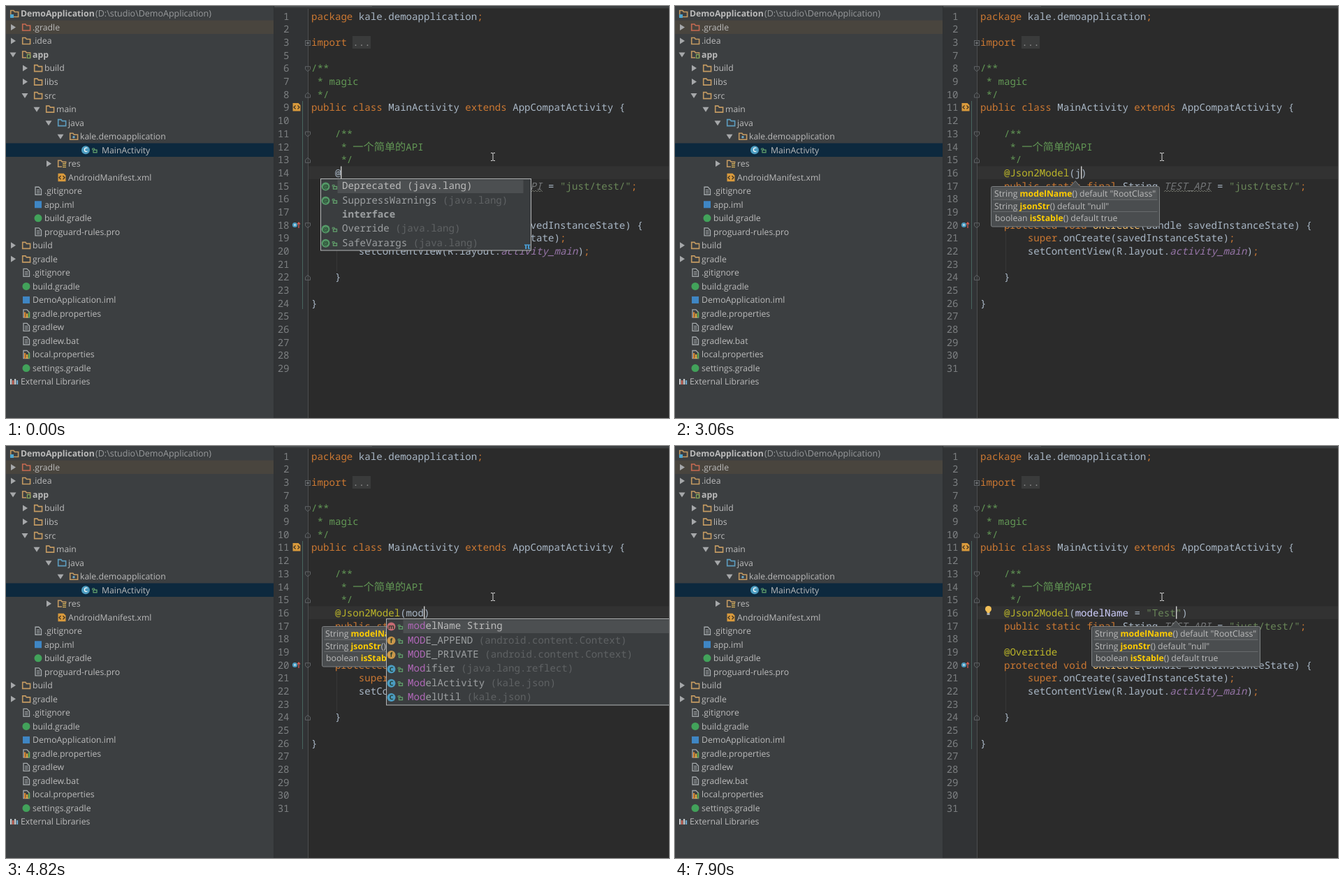
An HTML page for the animation above (8000 ms loop, 949x590 px).

```html
<!DOCTYPE html>
<html lang="en">
<head>
<meta charset="utf-8">
<title>Code completion</title>
<style>
html, body { margin: 0; width: 100%; height: 100%; overflow: hidden; background: #2b2b2b; }
svg { display: block; width: 949px; height: 590px; }
text { white-space: pre; text-rendering: geometricPrecision; }
.mono { font: 14.13px "Noto Sans Mono", monospace; fill: #a9b7c6; }
.ui { font: 12.25px "Open Sans", sans-serif; fill: #bbbbbb; }
.num { fill: #7c7f81; text-anchor: end; }
.b { font-weight: bold; }
.k { fill: #cc7832; }
.d { fill: #629755; }
.c { fill: #629755; font: 15.2px "Noto Sans CJK SC", "Noto Sans CJK", sans-serif; }
.f { fill: #8c8c8c; }
.a { fill: #bbb529; }
.s { fill: #6a8759; }
.m { fill: #ffc66d; }
.i { fill: #9876aa; font-style: italic; }
.u { fill: #747678; font-style: italic; }
.n { fill: #d0d0ff; }
.p { fill: #ffef28; font-weight: bold; }
.x { fill: #b067b8; }
.y { fill: #ffcc00; font-weight: bold; }
.t { fill: #5f6264; }
</style>
</head>
<body>
<svg viewBox="0 0 949 590">
  <g id="tree"></g>
  <g id="editor"></g>
  <g id="live"></g>
</svg>
<script>
const CW = 8.478, ROW = 18.67, TREE_ROW = 19.52;
const colX = c => 437 + c * CW;
const rowY = r => 15 + r * ROW;
const $ = id => document.getElementById(id);

// Drawing helpers
const rect = (x, y, w, h, fill, more = '') =>
  `<rect x="${x}" y="${y}" width="${w}" height="${h}" fill="${fill}" ${more}/>`;
const line = (d, stroke, more = '') => `<path d="${d}" fill="none" stroke="${stroke}" ${more}/>`;
const shape = (d, fill) => `<path d="${d}" fill="${fill}"/>`;
const disc = (x, y, r, fill) => `<circle cx="${x}" cy="${y}" r="${r}" fill="${fill}"/>`;
const wave = (x, y, w, color) =>
  line(`M${x} ${y}` + 'l2 -2l2 2'.repeat(Math.max(1, Math.round(w / 4))), color);
// «kword» gives the word the class k
const mark = s => s.replace(/«(\w)(.*?)»/g, '<tspan class="$1">$2</tspan>');
const plain = s => s.replace(/«\w|»/g, '');
const mono = (x, y, s, cls = '') => `<text class="mono ${cls}" x="${x}" y="${y + 4.8}">${mark(s)}</text>`;
const ui = (x, y, s, cls = '') => `<text class="ui ${cls}" x="${x}" y="${y + 4.4}">${mark(s)}</text>`;

// Icons, centred on x, y
const folder = (x, y, c) =>
  line(`M${x - 5.3} ${y + 4.5}v-9h4.2l1.5 2h5.2v7z`, c, 'stroke-width="1.6"');
const badge = (x, y, c, ch, ink = '#fff') => disc(x, y, 6, c) +
  `<text x="${x}" y="${y + 3.2}" text-anchor="middle" fill="${ink}" style="font:bold 9px 'Open Sans',sans-serif">${ch}</text>`;
const lock = (x, y) => rect(x - 2, y, 5, 3.6, 'none', 'stroke="#62a06c" stroke-width="1.3"') +
  line(`M${x - 3.3} ${y}v-2.2h3v2`, '#62a06c');
const bars = (x, y, cols) => cols.map((c, i) => rect(x + i * 3, y - 3 + i * 2 % 4, 2.2, 8 - i * 2 % 4, c)).join('');
const page = (x, y) => line(`M${x - 4} ${y - 5.5}h5l3.5 3.5v7.5h-8.5z`, '#a4a9ac', 'stroke-width="1.3"');

const icons = {
  dir: (x, y) => folder(x, y, '#c39a62'),
  out: (x, y) => folder(x, y, '#c66a52'),
  java: (x, y) => folder(x, y, '#5c9cbe'),
  root: (x, y) => folder(x, y, '#c39a62') + rect(x - 6, y + 1, 5, 5, '#4fa6d0'),
  mod: (x, y) => folder(x, y, '#c39a62') + rect(x, y - 1, 6, 6, '#3c3f41') +
    rect(x + 1.5, y, 4, 5, 'none', 'stroke="#86a85a" stroke-width="1.3"'),
  pkg: (x, y) => folder(x, y, '#c39a62') + disc(x, y + 1, 1.7, '#6faccb'),
  res: (x, y) => folder(x, y, '#c39a62') + rect(x, y - 1, 7, 7, '#3c3f41') +
    line(`M${x + 1} ${y}h5m-5 2.5h5m-5 2.5h5`, '#d9b45a', 'stroke-width="1.3"'),
  file: (x, y) => page(x, y) + line(`M${x - 2} ${y - 1.5}h4.5m-4.5 2.2h4.5m-4.5 2.2h4.5`, '#a4a9ac'),
  prop: (x, y) => page(x, y) + bars(x - 3, y + 1, ['#d9822f', '#e2b13f', '#5aa35a']),
  iml: (x, y) => rect(x - 5, y - 5, 10, 10, '#3f86c4'),
  gradle: (x, y) => disc(x, y, 5.5, '#42a25a'),
  xml: (x, y) => shape(`M${x - 5.5} ${y - 5.5}h8l3 3v8.5h-11z`, '#d99a3c') +
    line(`M${x - 1.5} ${y - 2}l-2.5 2.5l2.5 2.5m3 -5l2.5 2.5l-2.5 2.5`, '#3a3022', 'stroke-width="1.2"'),
  cls: (x, y) => badge(x, y, '#4b9cc0', 'C') + lock(x + 13, y),
  libs: (x, y) => bars(x - 6, y - 1, ['#c9ced1', '#d06a5c', '#c9ced1', '#6fa6c8'])
};

// depth, icon, arrow, label
const nodes = [
  [-1, 'root', '', 'DemoApplication'],
  [0, 'out', '>', '.gradle'], [0, 'dir', '>', '.idea'], [0, 'mod', 'v', 'app'],
  [1, 'dir', '>', 'build'], [1, 'dir', '>', 'libs'], [1, 'dir', 'v', 'src'],
  [2, 'dir', 'v', 'main'], [3, 'java', 'v', 'java'], [4, 'pkg', 'v', 'kale.demoapplication'],
  [5, 'cls', '', 'MainActivity'], [3, 'res', '>', 'res'], [3, 'xml', '', 'AndroidManifest.xml'],
  [1, 'file', '', '.gitignore'], [1, 'iml', '', 'app.iml'], [1, 'gradle', '', 'build.gradle'],
  [1, 'file', '', 'proguard-rules.pro'], [0, 'dir', '>', 'build'], [0, 'dir', '>', 'gradle'],
  [0, 'file', '', '.gitignore'], [0, 'gradle', '', 'build.gradle'], [0, 'iml', '', 'DemoApplication.iml'],
  [0, 'prop', '', 'gradle.properties'], [0, 'file', '', 'gradlew'], [0, 'file', '', 'gradlew.bat'],
  [0, 'prop', '', 'local.properties'], [0, 'gradle', '', 'settings.gradle'], [-1, 'libs', '', 'External Libraries']
];
const badNodes = [0, 3, 6, 7, 8, 9, 10];
const treeY = i => 11 + i * TREE_ROW;
const labelX = ([depth, icon]) => 38 + depth * 17 + (icon === 'cls' ? 14 : 0);

function drawTree() {
  let out = rect(0, 0, 384, 590, '#3c3f41') + rect(0, 20.5, 383, 19.5, '#49453e') +
    rect(0, 196.5, 383, 19.5, '#0d293e') + rect(383, 0, 1, 590, '#2f3133');
  nodes.forEach((node, i) => {
    const [depth, icon, arrow, label] = node, y = treeY(i), x = 10 + depth * 17;
    if (arrow === '>') out += shape(`M${x - 3} ${y - 4.5}l7 4.5l-7 4.5z`, '#a6a8aa');
    if (arrow === 'v') out += shape(`M${x - 4.5} ${y - 3}h9l-4.5 7z`, '#a6a8aa');
    out += icons[icon](x + 19, y) + ui(labelX(node), y, label, i === 0 || i === 3 ? 'b label' : 'label');
  });
  out += `<text class="ui" x="128" y="15.4" style="font-size:12.5px;fill:#989a9c">(D:\\studio\\DemoApplication)</text>`;
  $('tree').innerHTML = out;
}

const ANN_ROW = 12;
const code = [
  '«kpackage» kale.demoapplication«k;»', '', '«kimport» «f...»', '',
  '«d/**»', '«d * magic»', '«d */»',
  '«kpublic class» MainActivity «kextends» AppCompatActivity {', '',
  '    «d/**»', '    «d * »«c一个简单的»«dAPI»', '    «d */»', '',
  '    «kpublic static final» String «uTEST_API» = «s"just/test/"»«k;»', '',
  '    «a@Override»',
  '    «kprotected void» «monCreate»(Bundle savedInstanceState) {',
  '        «ksuper».onCreate(savedInstanceState)«k;»',
  '        setContentView(R.layout.«iactivity_main»)«k;»', '', '    }', '', '}'
];
const codeRows = (from, to) => code.slice(from, to)
  .map((s, i) => s && mono(437, rowY(from + i), s)).join('');
const fold = (y, up) => line(`M428.5 ${y - 3 * up}h7v${4 * up}l-3.5 3l-3.5 -3z`.replace('l-3.5 3l-3.5 -3', `l-3.5 ${3 * up}l-3.5 ${-3 * up}`),
  '#606366');

function drawEditor() {
  $('editor').innerHTML =
    rect(384, 0, 565, 590, '#2b2b2b') + rect(384, 0, 48, 590, '#313335') + rect(432, 0, 1, 590, '#4b4d4f') +
    rect(384, 0, 565, 3, '#3c3f41') + rect(384, 0, 140, 1, '#55585a') + rect(384, 3, 565, 1, '#323232') +
    rect(496, 43, 26, 18, '#3a3b3b') + codeRows(0, 3) +
    rect(428.5, 49.5, 7, 7, '#313335', 'stroke="#606366"') + line('M430 53h4m-2 -2v4', '#808386') +
    `<g id="numbers"></g><g id="lower">` +
    rect(433, rowY(ANN_ROW) - 9.5, 516, 18.5, '#323232') +
    rect(424, 136, 1, 298, '#48655f') + rect(473, 324, 1, 56, '#373737') +
    [4, 9, 16].map(r => fold(rowY(r), 1)).join('') + [6, 11, 20].map(r => fold(rowY(r) + 1, -1)).join('') +
    icons.xml(416, 144.5) + disc(413.5, 313.5, 3.6, '#4b9cc0') + disc(413.5, 313.5, 1.3, '#dbe7ee') +
    line('M419 318v-8m-2 2.5l2 -2.5l2 2.5', '#d05a50', 'stroke-width="1.3"') +
    codeRows(4) + wave(700, 266, 68, '#6c6e66') +
    `<g id="annotation"></g></g>`;
}

// Completion lists: icon letter, name, tail
const lists = {
  at: { col: 5, w: 301, h: 102, hint: true, rows: [
    ['@', 'Deprecated', '(java.lang)'], ['@', 'SuppressWarnings', '(java.lang)'], ['', 'interface', ''],
    ['@', 'Override', '(java.lang)'], ['@', 'SafeVarargs', '(java.lang)']] },
  json: { col: 5, w: 401, h: 41, rows: [
    ['@', 'Json2Model', '(kale.json)'], ['@', 'JsonAdapter', '(com.google.gson.annotations)']] },
  j: { col: 16, w: 420, h: 215, rows: [
    ['m', 'jsonStr', 'String'], ['@', 'Json2Model', '(kale.json)'],
    ['@', 'JsonAdapter', '(com.google.gson.annotations)'], ['C', 'JSONObject', '(org.json)'],
    ['C', 'JSONArray', '(org.json)'], ['C', 'JSONException', '(org.json)'], ['C', 'JSONTokener', '(org.json)'],
    ['C', 'JSONStringer', '(org.json)'], ['C', 'JarFile', '(java.util.jar)'], ['C', 'JarEntry', '(java.util.jar)']] },
  mod: { col: 16, w: 420, h: 123, rows: [
    ['m', 'modelName', 'String'], ['f', 'MODE_APPEND', '(android.content.Context)'],
    ['f', 'MODE_PRIVATE', '(android.content.Context)'], ['C', 'Modifier', '(java.lang.reflect)'],
    ['C', 'ModelActivity', '(kale.json)'], ['C', 'ModelUtil', '(kale.json)']] }
};
const iconColor = { '@': '#559a68', C: '#4b9cc0', m: '#c46a72', f: '#c9974a' };

function popup({ col, w, h, rows, hint }, prefix) {
  const x = Math.round(colX(col) - 29) + 0.5, top = 248;
  let out = rect(x, top - 0.5, w, h + 0.5, '#3a3d3f', 'stroke="#b4b6b7"') +
    rect(x + 24, top + 1, w - (hint ? 35 : 25), 19, '#4c4f51');
  rows.forEach(([icon, name, tail], i) => {
    const y = top + 9.5 + i * 20.3, tone = i ? '#9da0a2' : '#bbbbbb';
    if (icon) out += badge(x + 7, y + 1, iconColor[icon], icon, '#243a2b') + lock(x + 20, y + 1);
    const head = prefix ? `«x${name.slice(0, prefix)}»` + name.slice(prefix) : name;
    out += `<g>${mono(x + 30.5, y, head + (i ? ` «t${tail}»` : ' ' + tail), icon ? '' : 'b')}</g>`
      .replace('class="mono', `style="fill:${tone}" class="mono`);
  });
  return out + (hint ? `<text x="${x + 291}" y="${top + 100}" fill="#4a9bd0" style="font:bold 12px 'DejaVu Sans',sans-serif">π</text>` : '');
}

const params = ['String «ymodelName»() default "RootClass"', 'String «yjsonStr»() default "null"',
  'boolean «yisStable»() default true'];

function tooltip(col) {
  const c = Math.round(colX(col)), x = c - 120.5;
  return `<path d="M${x + 2} 258.5H${c - 7}l7 -8l7 8H${x + 239}q2 0 2 2V314q0 2 -2 2H${x + 2}q-2 0 -2 -2V260.5q0 -2 2 -2z" fill="#4a4d4f" stroke="#7d8082"/>` +
    rect(x + 3, 261, 235, 16, '#535658') +
    line(`M${x + 3} 277.5h235m-235 17h235`, '#686b6d') +
    params.map((s, i) => ui(x + 4.5 + (i > 1), 269 + i * 17.2, s)).join('');
}

const bulb = () => disc(448.5, 233.5, 4.5, '#f2bf57') + rect(446.5, 237, 4, 2, '#f2bf57') +
  rect(446.5, 239, 4, 3, '#a9adb0');

// "|" in ann is the caret
const call = arg => `«a@Json2Model»(${arg})`;
const str = s => call(`«nmodelName» = «s"${s}|"»`);
const steps = [
  [0, { ann: '@|', list: 'at', prefix: 0, base: 2 }],
  [150, { ann: '@j|' }],
  [270, { list: 'json', prefix: 1 }],
  [420, { ann: '@js|', prefix: 2 }],
  [550, { ann: '@json|', prefix: 4 }],
  [980, { ann: '@Json2Model|', list: '', prefix: 0, pushed: true }],
  [1250, { pushed: false, base: 4 }],
  [1370, { ann: '«a@Json2Model»|', usage: true }],
  [1800, { ann: call('|') }],
  [2080, { usage: false }],
  [2650, { bulb: true }],
  [2790, { bulb: false }],
  [2920, { ann: call('j|') }],
  [3060, { tip: 16 }],
  [3180, { list: 'j', prefix: 1 }],
  [3680, { ann: call('|'), list: '' }],
  [4550, { ann: call('m|') }],
  [4680, { ann: call('mo|') }],
  [4820, { ann: call('mod|'), list: 'mod', prefix: 3 }],
  [5380, { ann: '«a@Json2Model»«p(»modelName = |«p)»', list: '', pair: true }],
  [5510, { tip: 0 }],
  [5650, { error: true }],
  [6060, { ann: call('modelName = «s"|"»'), pair: false, treeError: true }],
  [6180, { tip: 29 }],
  [6330, { ann: str(''), error: false }],
  [6610, { ann: str('T') }],
  [6760, { ann: str('Te') }],
  [6890, { ann: str('Tes') }],
  [7040, { ann: str('Test') }],
  [7200, { tip: 33 }],
  [7750, { treeError: false }],
  [7900, { bulb: true }]
];

function treeWaves() {
  const labels = document.querySelectorAll('.label');
  return badNodes.map(i => {
    const w = i ? labels[i].getComputedTextLength() : 274;
    return wave(labelX(nodes[i]), treeY(i) + 7.5, w, '#c8453f');
  }).join('');
}

function draw(s) {
  const y = rowY(ANN_ROW), top = y - 9.5;
  const caret = Math.round(colX(4 + plain(s.ann).indexOf('|')));
  const cell = c => rect(colX(c), top, CW, 18.5, '#3b514d');

  $('numbers').innerHTML = Array.from({ length: s.pushed ? 30 : 28 }, (_, r) =>
    mono(405.6, rowY(r), String(r < 3 ? r + 1 : r + s.base), 'num')).join('') +
    (s.pushed ? mono(437, rowY(4), '«kimport» kale.json.Json2Model«k;»') : '');
  $('lower').setAttribute('transform', `translate(0 ${s.pushed ? 2 * ROW : 0})`);
  $('annotation').innerHTML =
    (s.usage ? rect(colX(5), top, CW * 10, 18.5, '#32593d') : '') +
    (s.pair ? cell(15) + cell(28) : '') +
    mono(colX(4), y, s.ann.replace('|', '')) +
    (s.error ? wave(666, 247, 8, '#bc3f3c') : '') +
    rect(caret, top, 1.4, 18, '#d0d0d0');
  $('live').innerHTML =
    (s.treeError ? treeWaves() : '') + (s.bulb ? bulb() : '') +
    (s.tip ? tooltip(s.tip) : '') + (s.list ? popup(lists[s.list], s.prefix) : '') +
    line('M694 210.5h2.2l.8 .8l.8 -.8h2.2M697 211v10M694 221.5h2.2l.8 -.8l.8 .8h2.2', '#d8d8d8');
}

drawTree();
drawEditor();
const start = performance.now();
let shown = -1;
function tick() {
  const t = (performance.now() - start) % 8000;
  const done = steps.filter(([at]) => at <= t);
  if (done.length !== shown) {
    shown = done.length;
    draw(Object.assign({}, ...done.map(([, change]) => change)));
  }
  requestAnimationFrame(tick);
}
tick();
</script>
</body>
</html>
```
